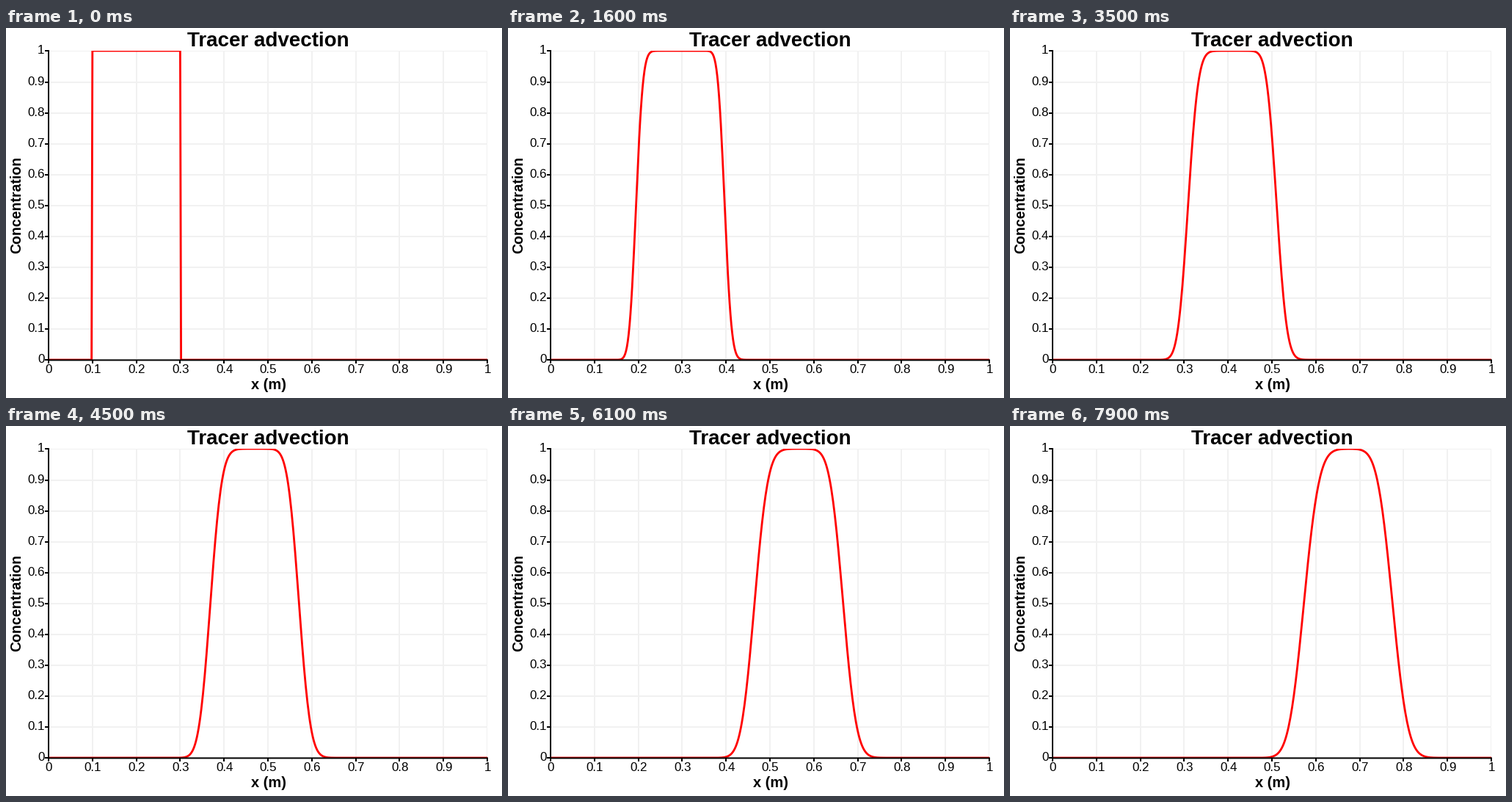
Recreate the animation shown at these times as a matplotlib script. Size 676x504 px, loop 8000 ms.

```python
import numpy as np
import matplotlib.pyplot as plt
from matplotlib.animation import FuncAnimation
from matplotlib.patches import Rectangle

W, H, DPI = 676, 504, 64
PT = 72 / DPI
LEFT, RIGHT, TOP, BOTTOM = 58, 656, 31, 452
FRAMES, INTERVAL = 80, 100

# First-order upwind scheme on a uniform grid
CELLS, COURANT, STEPS = 500, 0.2, 15

plt.rcParams["font.family"] = "Liberation Sans"


def px(x):
    return LEFT + (RIGHT - LEFT) * x


def py(y):
    return BOTTOM + (TOP - BOTTOM) * y


def simulate():
    i = np.arange(CELLS + 1)
    c = ((i >= 0.1 * CELLS) & (i <= 0.3 * CELLS)).astype(float)
    history = [c.copy()]
    for _ in range(FRAMES - 1):
        for _ in range(STEPS):
            c[1:] -= COURANT * np.diff(c)
        history.append(c.copy())
    return i / CELLS, history


fig = plt.figure(figsize=(W / DPI, H / DPI), dpi=DPI, facecolor="white")
ax = fig.add_axes([0, 0, 1, 1])
ax.set_xlim(0, W)
ax.set_ylim(H, 0)
ax.axis("off")

area = Rectangle((LEFT, TOP), RIGHT - LEFT, BOTTOM - TOP,
                 transform=ax.transData)


def segment(xs, ys, color="black", width=2.0, z=3, **kw):
    return ax.plot(xs, ys, color=color, lw=width * PT, zorder=z,
                   solid_capstyle="butt", **kw)[0]


def label(x, y, text, size, **kw):
    ax.text(x, y, text, fontsize=size * PT, color="black", zorder=4, **kw)


for i in range(11):
    v = i / 10
    x, y, name = px(v), np.ceil(py(v)), f"{v:g}"
    if i:
        for line in (segment([x, x], [TOP, BOTTOM], "#f1f1f1", z=1),
                     segment([LEFT, RIGHT], [y, y], "#f1f1f1", z=1)):
            line.set_clip_path(area)
    segment([x, x], [BOTTOM, BOTTOM + 5])
    segment([LEFT - 5, LEFT], [y, y])
    label(x + 0.5, 470.5, name, 17, ha="center", va="baseline")
    label(52.5, y + 4, name, 17, ha="right", va="baseline")

# The baseline stays soft so the curve shows through its upper edge
segment([LEFT, LEFT], [TOP - 1, BOTTOM + 1])
segment([LEFT - 1, RIGHT + 1], [BOTTOM + 0.4, BOTTOM + 0.4], snap=False)

label(357.5, 25, "Tracer advection", 27.8, weight="bold", ha="center",
      va="baseline")
label(357.5, 492, "x (m)", 20, weight="bold", ha="center", va="baseline")
label(20, 241, "Concentration", 19.5, weight="bold", ha="center",
      va="baseline", rotation=90, rotation_mode="anchor")

grid, history = simulate()
curve = segment(px(grid), py(history[0]), "red", 2.8, z=2)
curve.set_solid_joinstyle("round")
curve.set_clip_path(area)


def update(i):
    curve.set_ydata(py(history[i]))
    return (curve,)


anim = FuncAnimation(fig, update, frames=FRAMES, interval=INTERVAL,
                     repeat=True, repeat_delay=0, blit=False)
plt.show()
```
